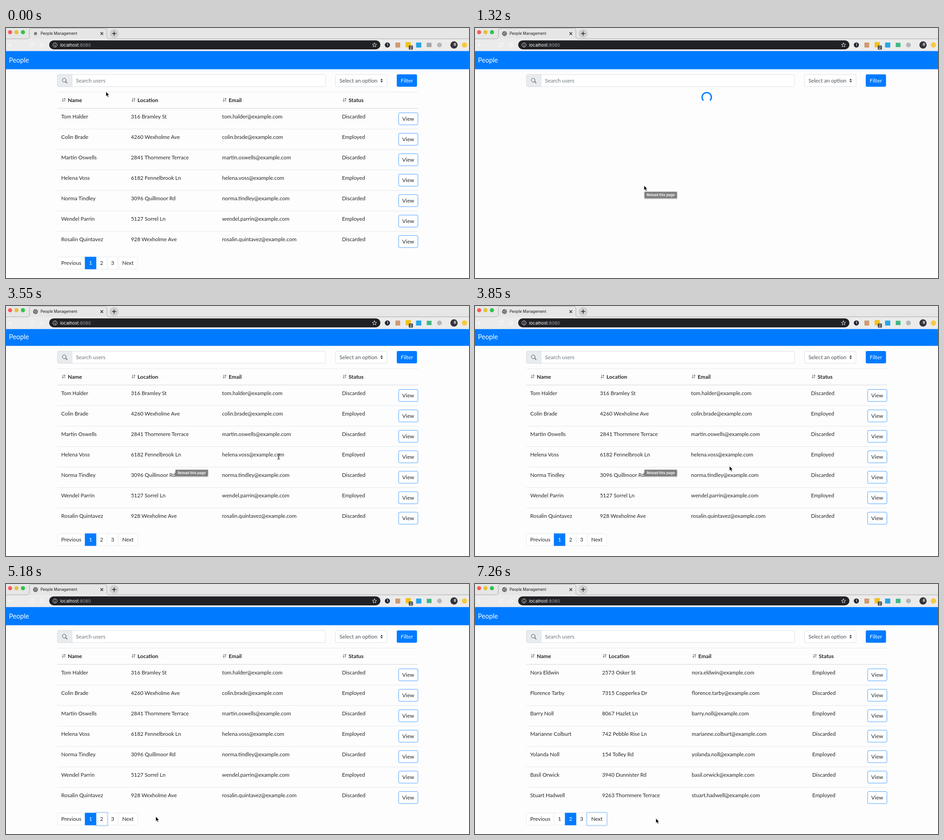
An HTML page for the animation above (8000 ms loop, 1019 by 550 pixels).

```html
<!DOCTYPE html>
<html lang="en">
<head>
<meta charset="utf-8">
<title>People Management</title>
<style>
  html, body { margin: 0; width: 100%; height: 100%; overflow: hidden; background: #fff; }
  svg { display: block; width: 100%; height: 100%; }
  text { font: 11.75px Lato, "Open Sans", sans-serif; fill: #212529; white-space: pre; }
  .ui { font-family: Inter, Roboto, sans-serif; }
  .bold { font-weight: 700; font-size: 11.9px; }
  .mid { text-anchor: middle; }
  .line { fill: none; stroke-linecap: round; stroke-linejoin: round; }
  .edge { stroke-width: .72; }
</style>
</head>
<body>
<svg id="stage" viewBox="0 0 1019 550" preserveAspectRatio="none">
  <defs>
    <clipPath id="view"><path d="M0 50.5H1019V550H0Z"/></clipPath>
    <filter id="shade" x="-10%" y="-30%" width="120%" height="180%">
      <feDropShadow dx="0" dy="1" stdDeviation="1.2" flood-opacity=".4"/>
    </filter>
    <path id="sort" class="line" d="M2.2 0V7M.6 5.4L2.2 7L3.8 5.4M6.2 7V0M4.6 1.6L6.2 0L7.8 1.6" stroke="#343a40" stroke-width=".8"/>
  </defs>
  <rect width="1019" height="550" fill="#fdfdfd"/>

  <g clip-path="url(#view)">
    <g id="page">
      <rect y="40" width="1019" height="50.7" fill="#007bff"/>
      <text x="6.5" y="75.5" style="font-size:14.7px;fill:#fff">People</text>

      <rect class="edge" x="113.4" y="102.4" width="590.2" height="26.5" rx="2.8" fill="#fff" stroke="#ced4da"/>
      <path class="edge" d="M145.4 102.4H116.2A2.8 2.8 0 0 0 113.4 105.2V126.1A2.8 2.8 0 0 0 116.2 128.9H145.4Z" fill="#e9ecef" stroke="#ced4da"/>
      <g class="line" stroke="#495057"><circle cx="128.2" cy="114.8" r="4.2"/><path d="M131.4 118L134.5 121.1" stroke-width="1.4"/></g>
      <text x="154" y="119.7" style="fill:#6c757d">Search users</text>
      <rect class="edge" x="725.4" y="102.4" width="113.2" height="26.5" rx="2.8" fill="#fff" stroke="#ced4da"/>
      <text x="734" y="119.7" style="fill:#495057">Select an option</text>
      <path d="M824 114.8L826.7 111.4L829.4 114.8ZM824 116.6L826.7 120L829.4 116.6Z" fill="#343a40"/>
      <rect x="860" y="102" width="44.6" height="27.2" rx="2.9" fill="#007bff"/>
      <text class="mid" x="882.3" y="119.7" style="fill:#fff">Filter</text>

      <g id="pager"></g>
      <circle id="spin" class="line" cx="510" cy="152.3" r="10.2" stroke="#007bff" stroke-width="2.9"
        pathLength="4" stroke-dasharray="3 1" stroke-dashoffset="-.5" style="stroke-linecap:butt"/>
    </g>
  </g>

  <g id="browser">
    <rect width="1019" height="24" fill="#e6e6e6"/>
    <rect y="23.5" width="1019" height="27" fill="#ebebeb"/>
    <path d="M0 23.8H46Q51.5 23.8 51.5 18V6Q51.5 .5 57 .5H216.500Q222 .5 222 6V18Q222 23.8 227.5 23.8H1019" fill="none" stroke="#a9a9a9"/>
    <circle cx="9" cy="9.2" r="4.5" fill="#fc5b57"/>
    <circle cx="23" cy="9.2" r="4.5" fill="#e5bf3c"/>
    <circle cx="37.3" cy="9.2" r="4.5" fill="#34c148"/>
    <g id="globe">
      <circle r="5.3" fill="#54585c"/>
      <path class="line" d="M-3.7 -1.5L-1 -.3L-1.5 2.8M.5 -3.7L1 -1.6L3.7 -.8M1.5 2.9L3 1.5" stroke="#e6e6e6" stroke-width="1.2"/>
    </g>
    <text class="ui" x="76" y="15.2" style="font-size:8.3px;fill:#1b1b1b">People Management</text>
    <path class="line" d="M208.400 9.7L213.4 14.7M213.4 9.7L208.4 14.7" stroke="#222" stroke-width="1.3"/>
    <circle cx="238" cy="12.2" r="10" fill="#cfcfcf"/>
    <path class="line" d="M234 12.2H242M238 8.2V16.2" stroke="#222" stroke-width="1.5"/>

    <g class="line" stroke="#fff" stroke-opacity=".65" stroke-width="1.2">
      <path d="M14.5 37.3H6.5M10 33.8L6.5 37.3L10 40.8"/>
      <path d="M60.5 35A4.2 4.2 0 1 0 61.2 38.5M61 32.8V35.6H58.2"/>
      <path d="M74.5 37.5L79 33.3L83.5 37.5M76 36.8V41.3H82V36.8"/>
    </g>
    <rect x="95" y="27.2" width="729" height="19.8" rx="9.9" fill="#202124"/>
    <g class="line" stroke="#e8eaed"><circle cx="108" cy="37.3" r="4.6"/><path d="M108 37V39.7M108 34.9V35" stroke-width="1.2"/></g>
    <text class="ui" x="119" y="40.8" style="font-size:9.6px;fill:#fff">localhost<tspan fill="#9aa0a6">:8080</tspan></text>
    <path id="star" class="line" stroke="#dadce0"/>

    <circle cx="839.4" cy="37.3" r="5.6" fill="#1e2430"/>
    <text class="ui mid" x="839.4" y="39.8" style="font-size:7px;font-weight:700;fill:#fff">1</text>
    <rect x="857" y="32" width="10.5" height="11" rx="1" fill="#cf9a72"/>
    <rect x="879.5" y="31" width="11.5" height="11.5" rx="1" fill="#f1c21b"/>
    <rect x="886.5" y="38.5" width="9" height="9" rx="1.5" fill="#41454a"/>
    <text class="ui mid" x="891" y="45.8" style="font-size:7.2px;font-weight:600;fill:#fff">2</text>
    <rect x="902.5" y="32" width="11.5" height="11" rx="1" fill="#25a5e8"/>
    <rect id="ext" x="926" y="32.5" width="10.5" height="9.5"/>
    <circle cx="954" cy="37.3" r="5.3" fill="#b4b6b8"/>
    <circle cx="986" cy="37.3" r="8" fill="#34343a"/>
    <ellipse cx="988" cy="36" rx="2.6" ry="3.6" fill="#a5a5aa"/>
    <circle cx="1009" cy="37.3" r="5.8" fill="#f8c93c"/>
  </g>

  <g id="tip">
    <rect x="373" y="360.2" width="71.5" height="14.3" fill="#7f7f7f" filter="url(#shade)"/>
    <text class="ui mid" x="408.7" y="370.2" style="font-size:7.75px;font-weight:600;fill:#fff">Reload this page</text>
  </g>

  <g id="cursor">
    <path id="arrow" d="M0 0V10.6L2.4 8.4L4.2 12.3L6 11.5L4.3 7.7H7.6Z" stroke="#fff" stroke-width=".8"/>
    <path id="beam" class="line" d="M-2.5 -5.8Q0 -5.8 0 -4.3Q0 -5.8 2.5 -5.8M0 -4.3V4.7M-2.5 6.2Q0 6.2 0 4.7Q0 6.2 2.5 6.2M-1.3 2.3H1.3" stroke="#222"/>
    <path id="hand" d="M-1 .8Q0 -.6 1 .8V4.8L5 5.6Q6.3 6 6 7.5L5.2 12H-.5L-4 7.7Q-3.6 6.4 -2.3 7L-1 8Z" fill="#fff" stroke="#111" stroke-width=".9" stroke-linejoin="round"/>
  </g>
</svg>

<script>
const LOOP = 8000, BLUE = '#007bff', ROW = 45;
const $ = id => document.getElementById(id);

function add(parent, tag, attrs, content) {
  const el = document.createElementNS('http://www.w3.org/2000/svg', tag);
  for (const key in attrs) el.setAttribute(key, attrs[key]);
  if (content) el.textContent = content;
  parent.appendChild(el);
  return el;
}
const show = (id, on) => $(id).setAttribute('display', on ? 'inline' : 'none');
const move = (id, x, y, extra = '') => $(id).setAttribute('transform', `translate(${x} ${y}) ${extra}`);

const lists = [
  { id: 'first', cols: [121.5, 275, 475.5, 739.5], status: ['Discarded', 'Employed'], rows: [
    ['Tom Halder', '316 Bramley St'],
    ['Colin Brade', '4260 Wexholme Ave'],
    ['Martin Oswells', '2841 Thornmere Terrace'],
    ['Helena Voss', '6182 Fennelbrook Ln'],
    ['Norma Tindley', '3096 Quillmoor Rd'],
    ['Wendel Parrin', '5127 Sorrel Ln'],
    ['Rosalin Quintavez', '928 Wexholme Ave']] },
  { id: 'second', cols: [121.5, 279.7, 477, 742.3], status: ['Employed', 'Discarded'], rows: [
    ['Nora Eldwin', '2573 Osker St'],
    ['Florence Tarby', '7315 Copperlea Dr'],
    ['Barry Noll', '8067 Hazlet Ln'],
    ['Marianne Colburt', '742 Pebble Rise Ln'],
    ['Yolanda Noll', '154 Tolley Rd'],
    ['Basil Orwick', '3940 Dunnister Rd'],
    ['Stuart Hadwell', '9263 Thornmere Terrace']] }
];

function buildTable({ id, cols, status, rows }) {
  const g = add($('page'), 'g', { id });
  const rule = (y, w) => add(g, 'path', { d: `M113 ${y}H907`, stroke: '#dee2e6', 'stroke-width': w });
  rule(141.1, .8);
  rule(176.7, 1.4);
  ['Name', 'Location', 'Email', 'Status'].forEach((label, i) => {
    add(g, 'use', { href: '#sort', x: cols[i] + 1.5, y: 154.5 });
    add(g, 'text', { x: cols[i] + 14.5, y: 162.5, class: 'bold' }, label);
  });
  rows.forEach(([name, place], i) => {
    const y = i * ROW;
    const email = name.toLowerCase().replace(' ', '.') + '@example.com';
    if (i) rule(177.4 + y, .8);
    [name, place, email, status[i % 2]].forEach((s, c) => add(g, 'text', { x: cols[c], y: 198.5 + y }, s));
    add(g, 'rect', { class: 'edge', x: 864.2, y: 186.6 + y, width: 42.4, height: 26.4, rx: 2.6, fill: '#fff', stroke: BLUE });
    add(g, 'text', { x: 885.2, y: 203.5 + y, class: 'mid' }, 'View');
  });
}
lists.forEach(buildTable);

const edges = [113.4, 174, 198.2, 222.6, 246.9, 289.4];
const labels = ['Previous', '1', '2', '3', 'Next'];
const cell = (i, pad = 0) => ({
  x: edges[i] - pad, y: 503.8 - pad,
  width: edges[i + 1] - edges[i] + 2 * pad, height: 26.5 + 2 * pad
});
const set = (el, attrs) => { for (const key in attrs) el.setAttribute(key, attrs[key]); };

const boxes = labels.map((_, i) => add($('pager'), 'rect', { ...cell(i), class: 'edge', rx: i % 4 ? 0 : 2.8, stroke: '#dee2e6' }));
const mark = add($('pager'), 'rect', { class: 'edge', fill: BLUE, stroke: BLUE });
const ring = add($('pager'), 'rect', { rx: 2, fill: 'none', stroke: BLUE, 'stroke-opacity': .25, 'stroke-width': 2.3 });
const captions = labels.map((label, i) =>
  add($('pager'), 'text', { x: (edges[i] + edges[i + 1]) / 2, y: 521, class: 'mid' }, label));

let star = '';
for (let i = 0; i < 10; i++) {
  const a = i * Math.PI / 5, r = i % 2 ? 2.2 : 5;
  star += `${i ? 'L' : 'M'}${811 + r * Math.sin(a)} ${37.5 - r * Math.cos(a)}`;
}
$('star').setAttribute('d', star + 'Z');

// time, pointer x, pointer y, pointer shape
const steps = [
  [0, 220, 140], [140, 300, 240], [290, 354, 322], [440, 372, 346.5],
  [580, 372, 346.5], [730, 372, 346.5], [880, 372, 346.5], [1030, 372, 346.5],
  [1170, 372, 346.5], [1320, 372, 346.5],
  [2370, 379.5, 345.5], [2510, 400, 348], [2660, 445, 320], [2810, 503, 262],
  [2960, 548, 219], [3110, 584, 268], [3260, 600, 331, 'beam'],
  [3850, 560, 352], [4000, 395, 425], [4150, 250, 470], [4300, 222, 496],
  [4440, 212, 511, 'hand'], [4590, 210, 514, 'hand'], [4890, 240, 516, 'hand'],
  [5030, 300, 514], [5180, 329.5, 511.5],
  [6380, 312, 513], [6530, 281, 514, 'hand'], [6680, 268, 514, 'hand'],
  [7120, 345, 515], [7260, 398, 515.5]
];
const scrolls = [[0, 0], [3550, -3], [3700, -6], [3850, -3], [4000, 0]];
const latest = (table, t) => table.findLast(row => row[0] <= t);

function drawPager(t, x, y) {
  const active = t < 6080 ? 1 : 2;
  const focus = t < 4740 ? -1 : t < 6970 ? 2 : 4;
  boxes.forEach((box, i) => {
    const over = y > 503 && x > edges[i] && x < edges[i + 1];
    box.setAttribute('fill', over ? '#e9ecef' : '#fff');
    captions[i].style.fill = i === active ? '#fff' : '';
  });
  set(mark, cell(active));
  ring.setAttribute('display', focus < 0 ? 'none' : 'inline');
  if (focus >= 0) set(ring, cell(focus, 1.4));
}

function draw(now) {
  const t = now % LOOP;
  const [at, x, y, shape = 'arrow'] = latest(steps, t);
  const loading = t >= 290 && t < 1470;

  move('page', 0, latest(scrolls, t)[1]);
  show('first', !loading && t < 6080);
  show('second', t >= 6080);
  show('pager', !loading);
  show('spin', loading);
  $('spin').setAttribute('transform', `rotate(${90 + (at - 1320) * .48} 510 152.3)`);
  drawPager(t, x, y);

  move('globe', 65, 12.3, `scale(${t < 290 ? .6 : 1})`);
  $('ext').setAttribute('fill', t < 440 ? '#a3a6a9' : '#41b883');
  show('tip', t >= 730 && t < 4890);

  move('cursor', x, y);
  for (const id of ['arrow', 'beam', 'hand']) show(id, id === shape);
}

const start = performance.now();
function frame() {
  draw(performance.now() - start);
  requestAnimationFrame(frame);
}
frame();
</script>
</body>
</html>
```
